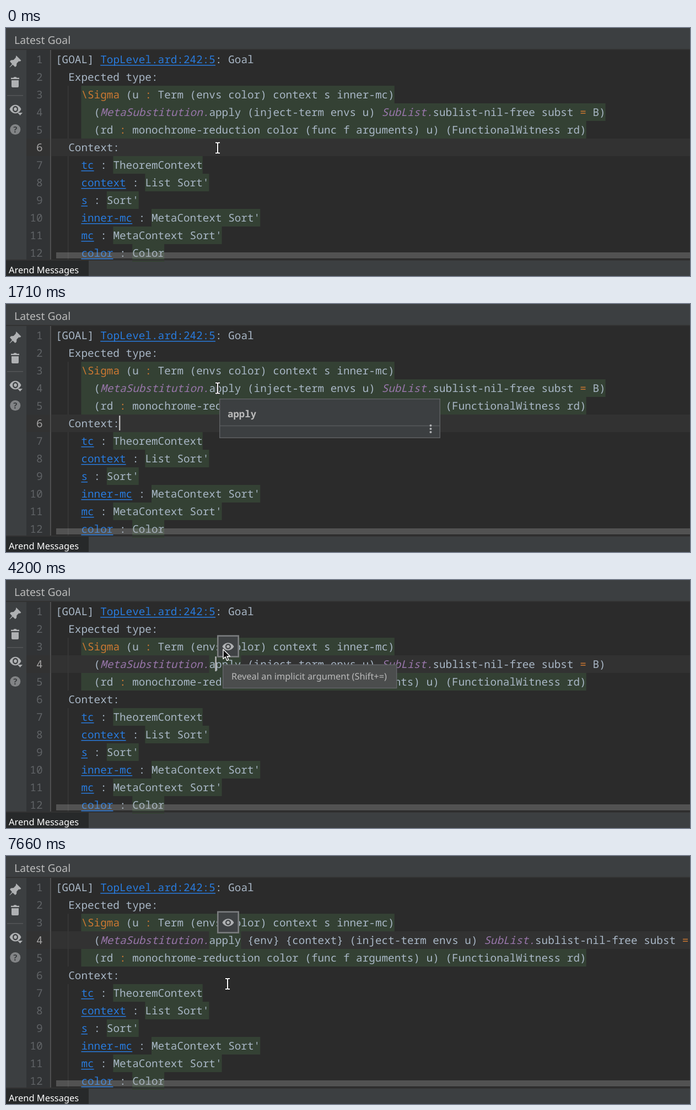
Write an HTML page that moves like this. It is 1241 by 451 pixels and loops after 8000 ms.

```html
<!DOCTYPE html>
<html lang="en">
<head>
<meta charset="utf-8">
<title>Latest Goal</title>
<style>
html, body { margin: 0; width: 100%; height: 100%; overflow: hidden; background: #2b2b2b; }
svg { display: block; width: 1241px; height: 451px; }
text { white-space: pre; text-rendering: geometricPrecision; }
.code { font: 19.333px "Noto Sans Mono", monospace; font-variant-ligatures: none; }
.ui { font-family: "Noto Sans", sans-serif; fill: #bbbbbb; }
.p { fill: #a9b7c6; }
.k { fill: #cc7832; }
.m { fill: #9876aa; font-style: italic; }
.l { fill: #287bde; }
.num { fill: #606366; text-anchor: end; }
.num.now { fill: #a4a3a3; }
.icon { fill: #afb1b3; }
</style>
</head>
<body>
<svg id="stage" viewBox="0 0 1241 451" xmlns="http://www.w3.org/2000/svg">
  <defs>
    <path id="eye" fill-rule="evenodd" d="M-10.5 0C-6-9 6-9 10.5 0C6 9-6 9-10.5 0ZM-5 0A5 5 0 1 0 5 0A5 5 0 1 0-5 0ZM-2.8 0A2.8 2.8 0 1 1 2.8 0A2.8 2.8 0 1 1-2.8 0Z"/>
  </defs>

  <rect width="1241" height="451" fill="#3c3f41"/>
  <rect y="38" width="1241" height="2" fill="#323232"/>
  <rect x="37" y="40" width="44" height="381" fill="#313335"/>
  <rect x="82" y="40" width="1159" height="381" fill="#2b2b2b"/>
  <rect id="caretRow" x="37" width="1204" height="32" fill="#323232"/>
  <rect x="80" y="40" width="1.5" height="381" fill="#555555"/>
  <path d="M112.7 105V201M112.7 233V421" stroke="#393939" stroke-width="1.5"/>
  <g id="boxes" fill="#344134"></g>
  <g id="code" class="code"></g>
  <rect id="caret" width="2.4" height="27" fill="#bbbbbb"/>
  <rect x="91" y="408" width="1150" height="11" fill="#a6a6a6" opacity=".32"/>

  <rect y="421" width="1241" height="2" fill="#323232"/>
  <rect y="423" width="150" height="28" fill="#27292a"/>
  <text class="ui" x="15" y="28.5" font-size="19.45">Latest Goal</text>
  <text class="ui" x="5" y="446" font-size="16.45" style="fill:#fff">Arend Messages</text>

  <g class="icon">
    <path d="M18.5 50L27.5 59L25 61L23.5 60.3L19.5 64.3L19 69L16.6 71L12.3 66.700L7 71.500L6.500 71L11 65.400L7 60.8L9 58.5L13.8 58L17.6 54Z"/>
    <path d="M9 90.500H13.500L14.500 89H18.500L19.500 90.500H24V93H9ZM10 95H23V106Q23 108 21 108H12Q10 108 10 106Z"/>
    <rect x="2" y="122" width="29" height="1.5" fill="#555759"/>
    <use href="#eye" transform="translate(17 147.500) scale(1 1.15)"/>
    <path d="M21 154H30L25.500 159Z"/>
    <circle cx="16.800" cy="184.500" r="9.500" fill="#828486"/>
    <text x="16.800" y="190" font-size="15" font-weight="700" text-anchor="middle" font-family="Noto Sans, sans-serif" fill="#3c3f41">?</text>
  </g>

  <g id="popup">
    <rect x="387.700" y="172.700" width="399.600" height="70.600" fill="#3c3f41" stroke="#606264" stroke-width="1.4"/>
    <path d="M388 221.500H787" stroke="#56595b" stroke-width="1.4"/>
    <text x="402" y="205.500" font-size="17.4" font-weight="700" font-family="Noto Sans Mono, monospace" fill="#bbbbbb">apply</text>
    <g class="icon"><circle cx="770.500" cy="221" r="2"/><circle cx="770.500" cy="227" r="2"/><circle cx="770.500" cy="233" r="2"/></g>
  </g>

  <g id="button">
    <rect id="frame"/>
    <use href="#eye" x="403" y="121" class="icon"/>
  </g>

  <g id="tip">
    <rect x="393.700" y="154.200" width="315" height="42.300" fill="#4b4d4d" stroke="#636569" stroke-width="1.4"/>
    <text class="ui" x="409" y="181" font-size="16.35">Reveal an implicit argument (Shift+=)</text>
  </g>

  <path id="beam" d="M-4-9.500H-1.200L0-8.500L1.200-9.500H4M-4 9.500H-1.200L0 8.500L1.200 9.500H4M0-8.500V8.500" fill="none"/>
  <path id="arrow" d="M0 0V17.500L4 13.800L6.800 20.500L9.800 19.200L7 12.800H12.500Z" fill="#111" stroke="#fff" stroke-width="1.4" stroke-linejoin="round"/>
</svg>
<script>
const LOOP = 8000, CELL = 11.6, LEFT = 90, ROW = 32, TOP = 41;
const $ = id => document.getElementById(id);
const colX = c => LEFT + c * CELL;
const rowY = r => TOP + (r - 1) * ROW;

function add(parent, tag, attrs, text) {
  const el = document.createElementNS("http://www.w3.org/2000/svg", tag);
  for (const k in attrs) el.setAttribute(k, attrs[k]);
  if (text) el.textContent = text;
  parent.append(el);
  return el;
}

// Tokens are "style|text", laid out on the character grid.
function write(parent, row, col, ...tokens) {
  for (const token of tokens) {
    const style = token[0], text = token.slice(2);
    add(parent, "text", { class: style, x: colX(col), y: rowY(row) + 23 }, text);
    if (style === "l")
      add(parent, "rect", { class: "l", x: colX(col), y: rowY(row) + 26, width: text.length * CELL, height: 1.5 });
    col += text.length;
  }
}

const box = (row, col, len) =>
  add($("boxes"), "rect", { x: colX(col), y: rowY(row), width: len * CELL, height: ROW });

const code = $("code");
const nums = Array.from({ length: 12 }, (_, i) =>
  add(code, "text", { class: "num", x: 66.5, y: rowY(i + 1) + 23 }, String(i + 1)));

write(code, 1, 0, "p|[GOAL] ", "l|TopLevel.ard:242:5", "p|: Goal");
write(code, 2, 2, "p|Expected type:");
box(3, 4, 49);
write(code, 3, 4, "k|\\Sigma", "p| (u ", "k|:", "p| Term (envs color) context s inner-mc)");
const wideBox = box(4, 4, 82), wordBox = box(4, 24, 5);
write(code, 4, 6, "p|(", "m|MetaSubstitution.", "p|apply");
const env = add(code, "g"), ctx = add(code, "g"), tail = add(code, "g");
write(env, 4, 30, "p|{env}");
write(ctx, 4, 36, "p|{context}");
write(tail, 4, 30, "p|(inject-term envs u) ", "m|SubList.", "p|sublist-nil-free subst ", "k|=", "p| B)");
box(5, 4, 79);
write(code, 5, 6, "p|(rd ", "k|:", "p| monochrome-reduction color (func f arguments) u) (FunctionalWitness rd)");
write(code, 6, 2, "p|Context:");
[["tc", "TheoremContext"], ["context", "List Sort'"], ["s", "Sort'"],
 ["inner-mc", "MetaContext Sort'"], ["mc", "MetaContext Sort'"], ["color", "Color"]
].forEach(([name, type], i) => {
  box(7 + i, 7 + name.length, type.length);
  write(code, 7 + i, 4, "l|" + name, "p| : ", "p|" + type);
});

// The cursor bar is the same shape drawn dark and wide, then light and thin.
const beam = $("beam"), beams = add($("stage"), "g");
for (const [stroke, width] of [["#111", 4.2], ["#fff", 2.1]]) {
  const b = beam.cloneNode();
  b.removeAttribute("id");
  b.setAttribute("stroke", stroke);
  b.setAttribute("stroke-width", width);
  beams.append(b);
}
beam.remove();

const CARET = [[0, 0], [310, 1], [700, 0], [1200, 1], [2630, 0], [3170, 1], [3670, 0],
  [4200, 1], [4770, 0], [4940, 1], [6230, 0], [6310, 1], [7110, 0]];
const ACTIVE_ROW = [[0, 6], [1740, 4]];
const POPUP = [[0, 0], [1460, .57], [1540, .85], [1600, 1], [1740, 0]];
const BUTTON = [[0, 0], [1740, .35], [1810, .7], [1890, 1]];
const TIP = [[0, 0], [3510, .3], [3590, .6], [3670, .85], [3740, 1], [4940, 0]];
const REVEAL = [[0, 0], [5000, 1], [6310, 2]];
const FRAME = [[0, "plain"], [2930, "hover"], [4940, "press"], [5000, "hover"], [6310, "press"], [6540, "hover"]];
const MOUSE = [[0, 384, 218], [310, 384, 217], [800, 384, 155], [1199, 384, 155], [1200, 384, 153],
  [2630, 384, 153], [3000, 394, 126], [7110, 394, 126], [7660, 402, 232.5], [LOOP, 402, 232.5]];
const LOOK = {
  plain: ["#3c3f41", "#808284", 1.4],
  hover: ["#3f4244", "#7b7d7f", 2.6],
  press: ["#55595c", "#7b7d7f", 2.6]
};

const at = (table, t) => table.findLast(s => s[0] <= t)[1];
const show = (el, v) => el.setAttribute("opacity", +v);

function mouseAt(t) {
  const i = MOUSE.findLastIndex(s => s[0] <= t);
  const a = MOUSE[i], b = MOUSE[i + 1];
  const u = (t - a[0]) / (b[0] - a[0]);
  const e = u * u * (3 - 2 * u);
  return [a[1] + (b[1] - a[1]) * e, a[2] + (b[2] - a[2]) * e];
}

function draw(t) {
  const row = at(ACTIVE_ROW, t), shown = at(REVEAL, t);
  $("caretRow").setAttribute("y", rowY(row));
  nums.forEach((n, i) => n.classList.toggle("now", i + 1 === row));
  show(wideBox, row !== 4);
  show(wordBox, row === 4);
  show(env, shown > 0);
  show(ctx, shown > 1);
  tail.setAttribute("transform", `translate(${[0, 6, 16][shown] * CELL} 0)`);

  $("caret").setAttribute("x", row === 6 ? 205 : 379.4);
  $("caret").setAttribute("y", rowY(row) + 2);
  show($("caret"), at(CARET, t));
  show($("popup"), at(POPUP, t));
  show($("button"), at(BUTTON, t));
  show($("tip"), at(TIP, t));

  const [fill, stroke, w] = LOOK[at(FRAME, t)];
  const look = { x: 383 + w / 2, y: 100.3 + w / 2, width: 40 - w, height: 40.4 - w, fill, stroke, "stroke-width": w };
  for (const k in look) $("frame").setAttribute(k, look[k]);

  const [x, y] = mouseAt(t), over = t > 1890 && y < 141;
  show($("arrow"), over);
  show(beams, !over);
  for (const el of [$("arrow"), beams]) el.setAttribute("transform", `translate(${x} ${y})`);
}

function tick() {
  draw(performance.now() % LOOP);
  requestAnimationFrame(tick);
}
tick();
</script>
</body>
</html>
```
